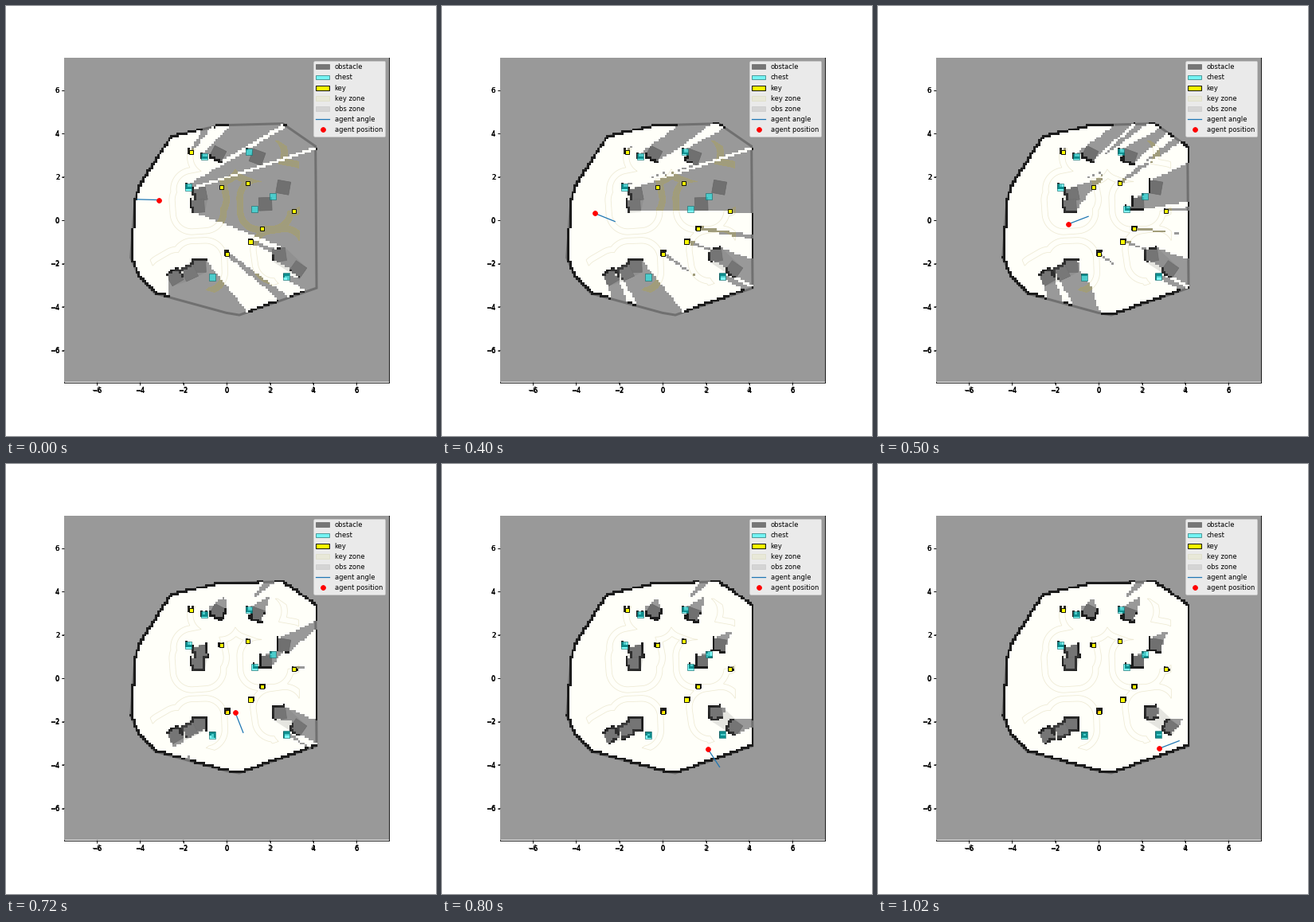
These frames come from a looping animation (540 px wide and 540 px high, 1.1 s). A matplotlib script:

```python
import numpy as np
import matplotlib.pyplot as plt
from matplotlib.animation import FuncAnimation
from matplotlib.lines import Line2D
from matplotlib.patches import Patch, Polygon
from matplotlib.path import Path

LIM, CELL, FINE = 7.5, 0.1, 0.025
N, M = round(2 * LIM / CELL), round(2 * LIM / FINE)
BLOCK, CHEST, KEY = 0.6, 0.3, 0.2
UNKNOWN, OBSTACLE = "#999999", "#707070"

WALL = np.array([
    (2.6, 4.45), (4.12, 3.4), (4.17, -3.15), (0.6, -4.4), (0, -4.3),
    (-3.3, -3.4), (-4.05, -2.6), (-4.42, -1.75), (-4.22, 0.95),
    (-3.98, 1.7), (-2.55, 3.85), (-0.3, 4.37)])

# block: centre and tilt in degrees
BLOCKS = [(-0.40, 3.03, -27), (1.43, 2.90, -20), (2.63, 1.50, -10),
          (1.80, 0.73, 2), (-1.22, 1.18, 11), (-1.32, 0.64, 4),
          (2.45, -1.62, 8), (3.30, -2.30, -35), (-1.25, -2.13, 2),
          (-1.70, -2.45, 25), (-2.38, -2.65, 30)]
CHESTS = [(-1.03, 2.94), (1.05, 3.14), (-1.75, 1.51), (2.15, 1.08),
          (1.31, 0.51), (-0.64, -2.65), (2.78, -2.61)]
KEYS = [(-1.62, 3.14), (-0.22, 1.51), (0.99, 1.69), (3.13, 0.40),
        (1.64, -0.40), (1.12, -1.01), (0.02, -1.58)]

# stop: position, heading in degrees, ticks it is held
STOPS = [(-3.12, 0.92, 178.5, 4), (-3.12, 0.30, -22, 1),
         (-1.40, -0.20, 21, 1), (0.41, -1.60, -68.5, 2),
         (2.10, -3.28, -57, 1), (2.80, -3.27, 21, 2)]
TIMELINE = np.repeat(np.arange(len(STOPS)), [s[3] for s in STOPS])
PICKUP = 3


def square(cx, cy, side, tilt=0):
    a = np.radians(tilt + np.array([45, 135, 225, 315]))
    r = side / np.sqrt(2)
    return np.column_stack([cx + r * np.cos(a), cy + r * np.sin(a)])


def hull(points):
    """Convex hull by the monotone chain."""
    pts = sorted(map(tuple, points))
    out = []
    for run in (pts, pts[::-1]):
        half = []
        for p in run:
            while len(half) > 1:
                (ax_, ay), (bx, by) = half[-2:]
                if (bx - ax_) * (p[1] - ay) - (by - ay) * (p[0] - ax_) > 0:
                    break
                half.pop()
            half.append(p)
        out += half[:-1]
    return out


def edge_distance(x, y, poly):
    """Distance from every point to the outline of a closed polygon."""
    best = np.full(x.shape, np.inf)
    for (ax_, ay), (bx, by) in zip(poly, np.roll(poly, -1, axis=0)):
        dx, dy = bx - ax_, by - ay
        t = np.clip(((x - ax_) * dx + (y - ay) * dy) / (dx**2 + dy**2), 0, 1)
        best = np.minimum(best, np.hypot(x - ax_ - t * dx, y - ay - t * dy))
    return best


def inside(x, y, poly):
    pts = np.column_stack([x.ravel(), y.ravel()])
    return Path(poly).contains_points(pts).reshape(x.shape)


def solid_cells():
    c = -LIM + FINE * (np.arange(M) + 0.5)
    x, y = np.meshgrid(c, c)
    solid = edge_distance(x, y, WALL) < 0.03
    bodies = [square(*p, 0.75 * CHEST) for p in CHESTS]
    for poly in blocks + keys + bodies:
        solid |= inside(x, y, poly)
    return solid


def cell(v, size):
    return ((v + LIM) / size).astype(int)


def scan(pos, solid, free, hit):
    """Cast rays all around and mark the cells they cross and strike."""
    a = np.linspace(0, 2 * np.pi, 800, endpoint=False)[:, None]
    r = np.arange(0, 9.5, 0.02)[None, :]
    x = np.clip(pos[0] + r * np.cos(a), -LIM, LIM - FINE / 2)
    y = np.clip(pos[1] + r * np.sin(a), -LIM, LIM - FINE / 2)
    first = solid[cell(y, FINE), cell(x, FINE)].argmax(axis=1)
    seen = np.arange(r.size)[None, :] < first[:, None]
    free[cell(y[seen], CELL), cell(x[seen], CELL)] = True
    rays = np.flatnonzero(first)
    end = rays, first[rays]
    hit[cell(y[end], CELL), cell(x[end], CELL)] = True


def ahead(x, y, heading):
    a = np.radians(heading)
    return x + np.cos(a), y + np.sin(a)


def scan_points(k):
    """Points passed from the previous stop: one step ahead, then across."""
    here = STOPS[k][:2]
    if k == 0:
        return [here]
    last = STOPS[k - 1][:3]
    corners = np.array([last[:2], ahead(*last), here])
    t = np.linspace(0, 2, 9)[1:]
    path = np.column_stack([np.interp(t, range(3), c) for c in corners.T])
    return path[Path(WALL).contains_points(path)]


def build_maps():
    solid = solid_cells()
    free, hit = np.zeros((2, N, N), bool)
    maps = []
    for k in range(len(STOPS)):
        for pos in scan_points(k):
            scan(pos, solid, free, hit)
        rgba = np.zeros((N, N, 4))
        rgba[free] = (1, 1, 0.98, 1)
        rgba[hit] = (0.11, 0.11, 0.11, 1)
        maps.append(rgba)
    return maps


def draw_key_zone(ax):
    """A band at a set distance from the blocks, kept off the wall."""
    g = np.linspace(-4.7, 4.7, 380)
    x, y = np.meshgrid(g, g)
    d = np.min([edge_distance(x, y, b) for b in blocks], axis=0)
    field = np.maximum(np.abs(d - 0.87) - 0.135,
                       0.78 - edge_distance(x, y, WALL))
    field[~inside(x, y, WALL)] = 1
    ax.contourf(x, y, field, levels=[-9, 0], colors=["#a09c7c"], zorder=0.5)
    ax.contour(x, y, field, levels=[0], colors=["#b8a860"], alpha=0.25,
               linewidths=0.9, linestyles="solid", zorder=2.1)


def obs_zones():
    """Hulls around neighbouring blocks."""
    return [hull(np.vstack([blocks[i], blocks[j]]))
            for i in range(len(blocks)) for j in range(i)
            if np.hypot(*np.subtract(BLOCKS[i][:2], BLOCKS[j][:2])) < 1.12]


def add_polys(ax, polys, **style):
    for p in polys:
        ax.add_patch(Polygon(p, closed=True, **style))


def add_legend(ax):
    handles = [
        Patch(fc="#767676", ec="#606060", lw=0.8, label="obstacle"),
        Patch(label="chest", **CHEST_STYLE),
        Patch(label="key", **KEY_STYLE),
        Patch(fc="#e8e8d8", ec="#dcdcc4", lw=0.8, label="key zone"),
        Patch(fc="#d4d4d4", ec="#cacaca", lw=0.8, label="obs zone"),
        Line2D([], [], color="C0", label="agent angle"),
        Line2D([], [], ls="", label="agent position", **AGENT_STYLE)]
    ax.legend(handles=handles, loc="upper right", fontsize=10)


CHEST_STYLE = dict(fc=(0, 1, 1, 0.5), ec="#207070", lw=0.8)
KEY_STYLE = dict(fc="yellow", ec="black", lw=1.1)
AGENT_STYLE = dict(color="red", marker="o", ms=7)

blocks = [square(x, y, BLOCK, tilt) for x, y, tilt in BLOCKS]
chests = [square(x, y, CHEST) for x, y in CHESTS]
keys = [square(x, y, KEY) for x, y in KEYS]
maps = build_maps()

# slightly larger axes behind give the offset frame and heavy tick labels
fig = plt.figure(figsize=(9, 9), dpi=60, facecolor="white")
back = np.array([73, 66.6, 408.2, 408.6]) / 540
front = np.array([73, 67.7, 407.5, 407.5]) / 540
layers = [fig.add_axes(r, label=str(i))
          for i, r in enumerate((back, back, front))]
ax = layers[-1]
ax.set_facecolor(UNKNOWN)
ax.spines[:].set_visible(False)

draw_key_zone(ax)
add_polys(ax, blocks, fc=OBSTACLE, ec="#666666", lw=0.8, zorder=1)
add_polys(ax, [WALL], fc="none", ec=OBSTACLE, lw=3.6, zorder=1)
grid = ax.imshow(maps[0], extent=[-LIM, LIM, -LIM, LIM], origin="lower",
                 interpolation="nearest", aspect="auto", zorder=2)
add_polys(ax, obs_zones(), fc=(0.5, 0.5, 0.5, 0.2), ec="none", zorder=1.9)
add_polys(ax, obs_zones(), fc=(0.5, 0.5, 0.5, 0.2), ec="none", zorder=2.2)
add_polys(ax, chests, zorder=3, **CHEST_STYLE)
add_polys(ax, keys, zorder=3, **KEY_STYLE)
taken, = ax.plot(*KEYS[-1], "s", color="#ff9a10", ms=2.4, mew=0, zorder=3.1)
ray, = ax.plot([], [], color="C0", lw=1.5, zorder=4)
agent, = ax.plot([], [], ls="", zorder=4.1, **AGENT_STYLE)
add_legend(ax)

ticks = range(-6, 7, 2)
for layer in layers:
    layer.set(xlim=(-LIM, LIM), ylim=(-LIM, LIM), xticks=ticks, yticks=ticks)


def update(i):
    k = TIMELINE[i]
    x, y, heading, _ = STOPS[k]
    tip = ahead(x, y, heading)
    grid.set_data(maps[k])
    ray.set_data([x, tip[0]], [y, tip[1]])
    agent.set_data([x], [y])
    taken.set_visible(k >= PICKUP)
    return grid, ray, agent, taken


anim = FuncAnimation(fig, update, frames=len(TIMELINE), interval=100,
                     repeat=True, repeat_delay=0, blit=False)
plt.show()
```
